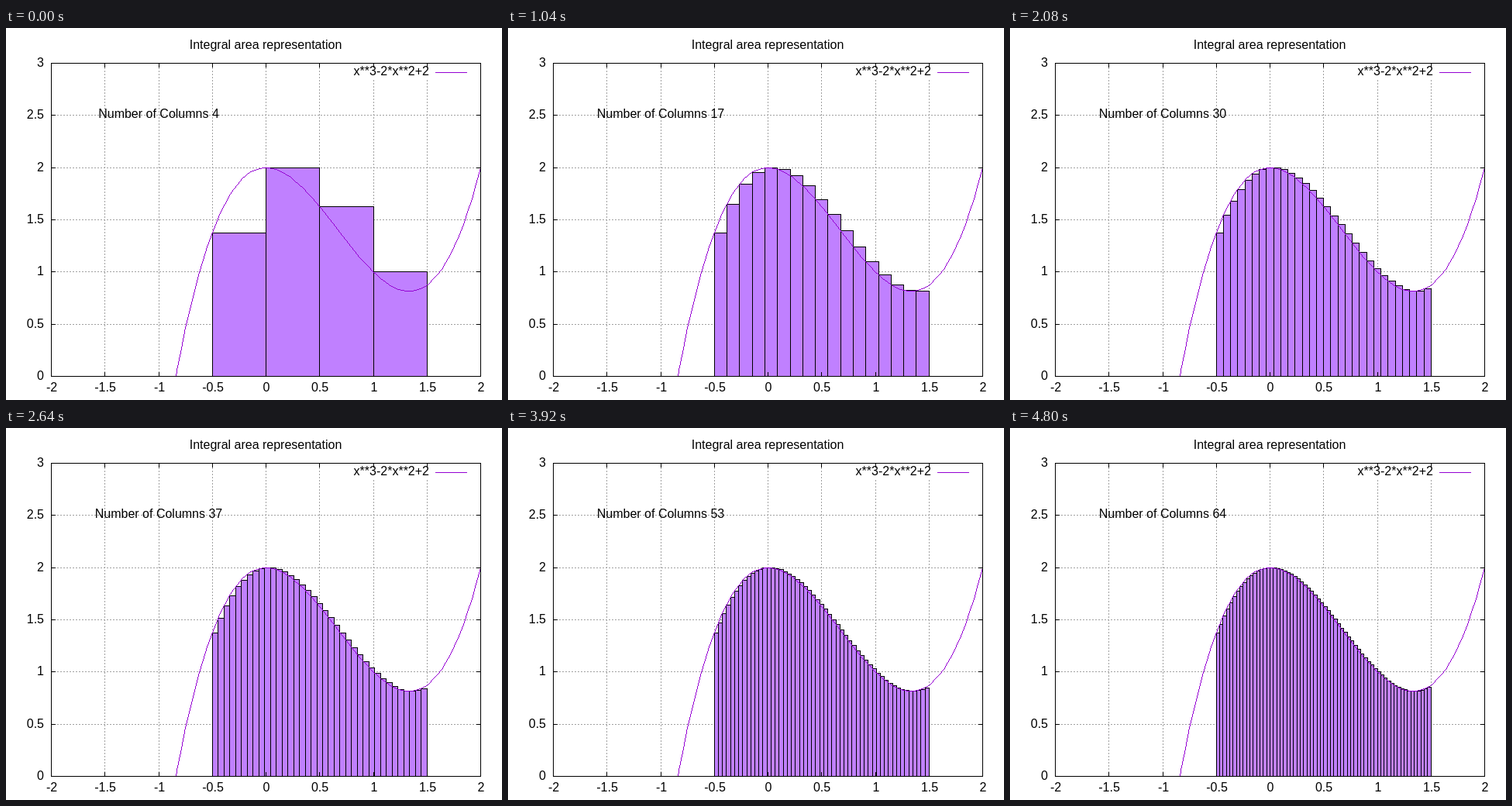
An HTML page with a canvas that plays this animation: 640 by 480 pixels, repeating every 4.88 s.

```html
<!DOCTYPE html>
<html>
<head>
<meta charset="utf-8">
<title>Integral area representation</title>
<style>
html, body { margin: 0; width: 100%; height: 100%; overflow: hidden; background: #fff; }
canvas { display: block; }
</style>
</head>
<body>
<canvas id="stage" width="640" height="480"></canvas>
<script>
const ctx = document.getElementById('stage').getContext('2d');
const LEFT = 58, RIGHT = 612, TOP = 45, BOTTOM = 449;
const STEP_MS = 80, FIRST = 4, LAST = 64;
const FROM = -0.5, TO = 1.5;
const PURPLE = '#9400d3';

const f = x => x ** 3 - 2 * x ** 2 + 2;
const px = x => Math.floor(LEFT + (x + 2) * (RIGHT - LEFT) / 4 + 0.5);
const py = y => BOTTOM - Math.floor(y * (BOTTOM - TOP) / 3 + 0.5);

function rect(x, y, w, h, color) {
  ctx.fillStyle = color;
  ctx.fillRect(x, y, w, h);
}

// Outline whose corner pixels are (x0, y0) and (x1, y1)
function frame(x0, y0, x1, y1) {
  ctx.strokeStyle = '#000';
  ctx.lineWidth = 1;
  ctx.strokeRect(x0 + 0.5, y0 + 0.5, x1 - x0, y1 - y0);
}

function text(s, x, y, align) {
  ctx.font = '16px "Liberation Sans", Arial, sans-serif';
  ctx.textAlign = align;
  ctx.fillStyle = '#000';
  ctx.fillText(s, x, y);
}

// One-pixel line without smoothing
function pixelLine(x0, y0, x1, y1, color) {
  const n = Math.max(Math.abs(x1 - x0), Math.abs(y1 - y0), 1);
  for (let i = 0; i <= n; i++) {
    rect(Math.round(x0 + (x1 - x0) * i / n), Math.round(y0 + (y1 - y0) * i / n), 1, 1, color);
  }
}

function dashed(x0, y0, x1, y1) {
  ctx.strokeStyle = '#a0a0a0';
  ctx.lineWidth = 1;
  ctx.setLineDash([2, 2]);
  ctx.beginPath();
  ctx.moveTo(x0, y0);
  ctx.lineTo(x1, y1);
  ctx.stroke();
  ctx.setLineDash([]);
}

function drawGrid() {
  for (let v = -1.5; v < 2; v += 0.5) {
    const x = px(v) + 0.5;
    dashed(x, BOTTOM, x, x > 447 ? 66 : TOP);
  }
  for (let v = 0.5; v < 3; v += 0.5) dashed(LEFT, py(v) + 0.5, RIGHT, py(v) + 0.5);
}

function drawColumns(count) {
  const width = (TO - FROM) / count;
  for (let i = 0; i < count; i++) {
    const x = FROM + i * width;
    const x0 = px(x), x1 = px(x + width), y = py(f(x));
    rect(x0, y, x1 - x0, BOTTOM - y, '#c080ff');
    frame(x0, y, x1, BOTTOM);
  }
}

function drawCurve() {
  const samples = 99;
  for (let i = 0; i < samples; i++) {
    let a = -2 + 4 * i / samples, b = a + 4 / samples;
    let ya = f(a), yb = f(b);
    if (yb < 0) continue;
    if (ya < 0) {
      a -= ya * (b - a) / (yb - ya);
      ya = 0;
    }
    pixelLine(px(a), py(ya), px(b), py(yb), PURPLE);
  }
}

function drawAxes() {
  frame(LEFT, TOP, RIGHT, BOTTOM);
  for (let v = -2; v <= 2; v += 0.5) {
    rect(px(v), TOP, 1, 6, '#000');
    rect(px(v), BOTTOM - 5, 1, 6, '#000');
    text(String(v), px(v) + 1, 469, 'center');
  }
  for (let v = 0; v <= 3; v += 0.5) {
    rect(LEFT, py(v), 6, 1, '#000');
    rect(RIGHT - 5, py(v), 6, 1, '#000');
    text(String(v), 49, py(v) + 5, 'right');
  }
}

function draw(count) {
  rect(0, 0, 640, 480, '#fff');
  drawGrid();
  drawColumns(count);
  drawCurve();
  drawAxes();
  text('Integral area representation', 335, 27, 'center');
  text('x**3-2*x**2+2', 546, 61, 'right');
  rect(554, 57, 41, 1, PURPLE);
  text('Number of Columns ' + count, 197, 116, 'center');
}

const start = performance.now();
function tick() {
  const step = Math.floor((performance.now() - start) / STEP_MS);
  draw(FIRST + step % (LAST - FIRST + 1));
  requestAnimationFrame(tick);
}
tick();
</script>
</body>
</html>
```
